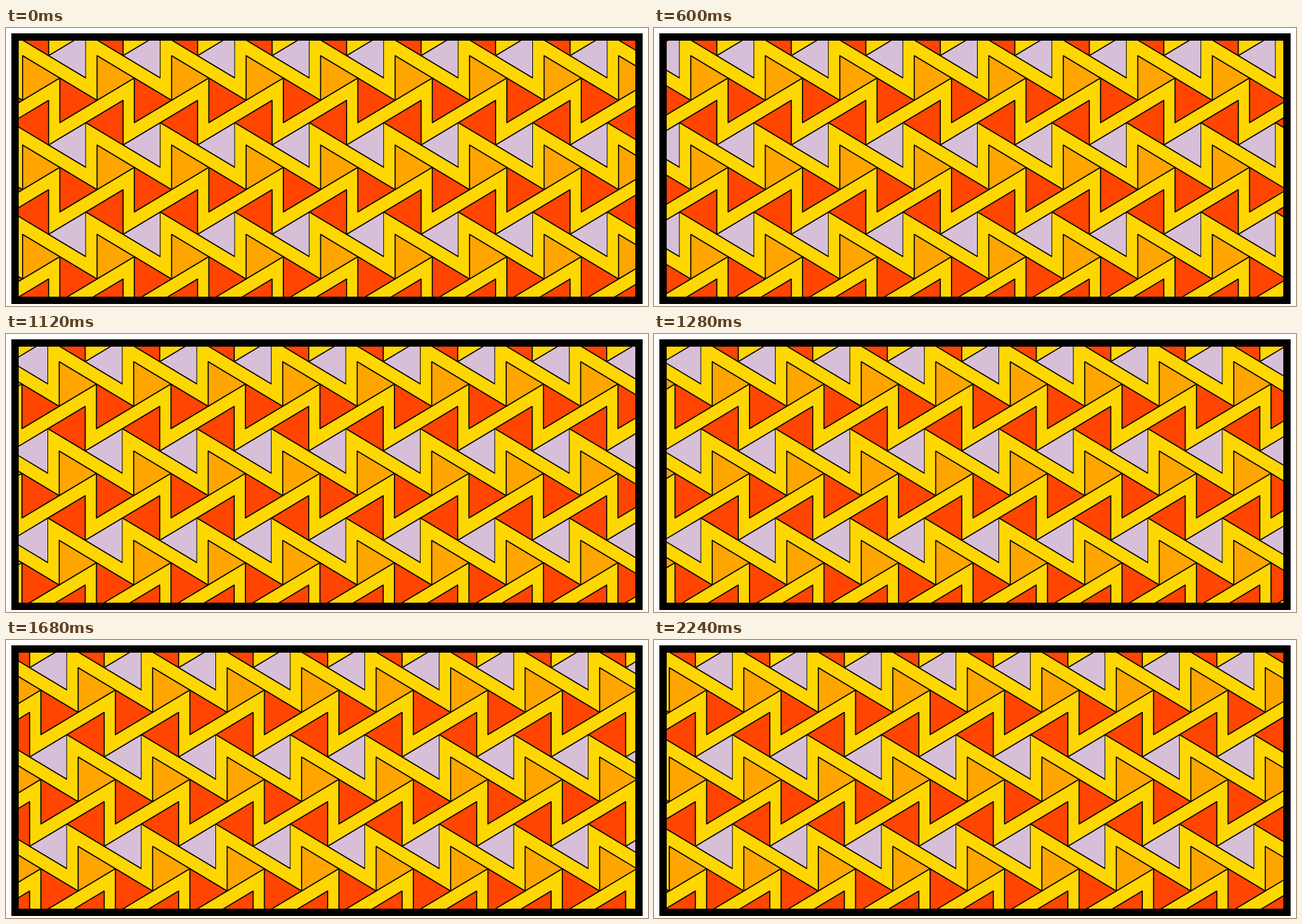
Recreate the animation shown at these times as an HTML page with a canvas. Size 960x417 px, loop 2.28 s.

```html
<!DOCTYPE html>
<html lang="en">
<head>
<meta charset="utf-8">
<title>Zigzag tessellation</title>
<style>
html, body { margin: 0; width: 100%; height: 100%; overflow: hidden; background: #fff; }
canvas { display: block; }
</style>
</head>
<body>
<canvas id="stage" width="960" height="417"></canvas>
<script>
const ctx = document.getElementById('stage').getContext('2d');

const LOOP = 2280, TICK = 40;
const W = 111.4, H = 134;          // tile size
const TRI_W = W / 2, TRI_H = H / 2;
const X0 = 24.8, Y0 = 41.5;        // tile origin at rest
const LINE = 1.6;
const GOLD = '#ffd700', ORANGE = '#ffa500', RED = '#ff4500', THISTLE = '#d8bfd8';

// Triangle with a vertical side at x; dir 1 points right, -1 points left.
function triangle(x, y, dir, fill) {
  ctx.beginPath();
  ctx.moveTo(x, y);
  ctx.lineTo(x + dir * TRI_W, y + TRI_H / 2);
  ctx.lineTo(x, y + TRI_H);
  ctx.closePath();
  ctx.fillStyle = fill;
  ctx.fill();
  ctx.stroke();
}

function tile(x, y) {
  const lx = x + 94.6, ly = y + TRI_H * 1.5;
  triangle(lx, ly, -1, THISTLE);
  // the band hides the outer half of this side's line
  ctx.fillStyle = GOLD;
  ctx.fillRect(lx + 0.2, ly + 1, 2, TRI_H);
  triangle(x, y, 1, ORANGE);
  triangle(x + TRI_W, y + TRI_H / 2, 1, RED);
  triangle(x + 38.9, y + TRI_H, -1, RED);
}

// 59 equal shifts per tile, shown in 57 ticks: two shifts are skipped.
function shiftAt(t) {
  const n = Math.floor((t % LOOP) / TICK);
  return Math.floor(n * 59 / 57 + 0.87) * W / 59;
}

function draw(t) {
  ctx.fillStyle = '#fff';
  ctx.fillRect(0, 0, 960, 417);
  ctx.fillStyle = '#000';
  ctx.fillRect(8, 8, 944, 406);

  ctx.save();
  ctx.beginPath();
  ctx.rect(19, 19, 922, 384);
  ctx.clip();
  ctx.fillStyle = GOLD;
  ctx.fillRect(19, 19, 922, 384);
  ctx.strokeStyle = '#000';
  ctx.lineWidth = LINE;
  ctx.lineJoin = 'round';
  const dx = X0 + shiftAt(t);
  for (let row = -1; row < 3; row++) {
    for (let col = -3; col < 10; col++) tile(dx + col * W, Y0 + row * H);
  }
  ctx.restore();
}

const start = performance.now();
function loop() {
  draw(performance.now() - start);
  requestAnimationFrame(loop);
}
loop();
</script>
</body>
</html>
```
